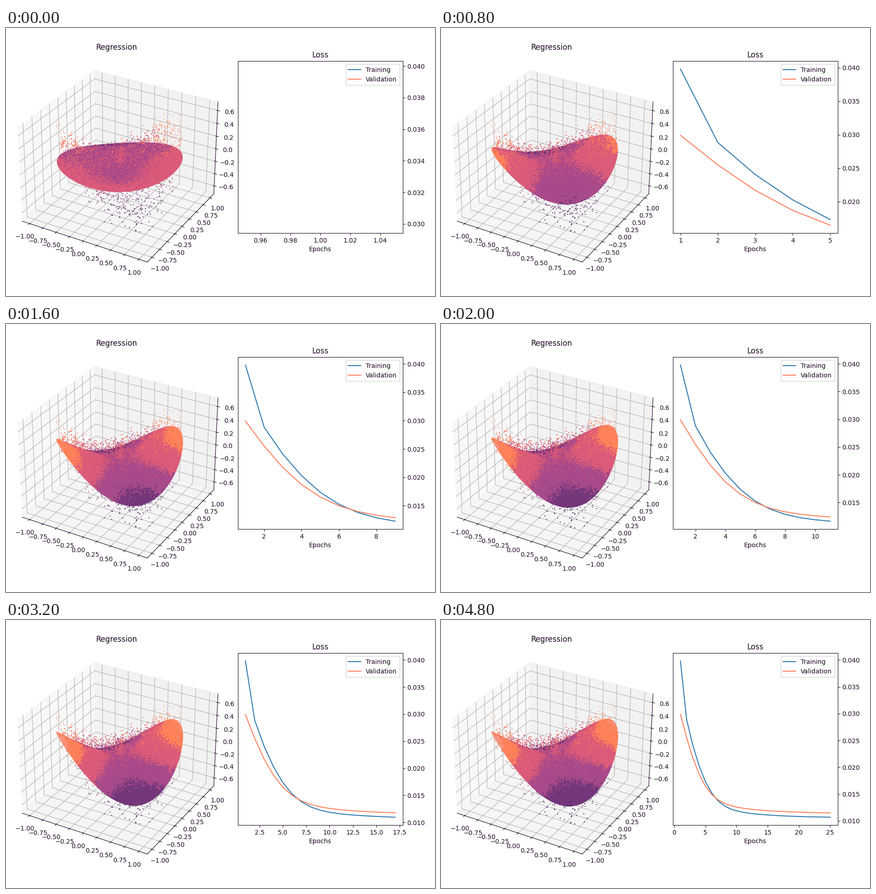
Animation, 947 px wide and 592 px high, one loop 5000 ms. Source, as a matplotlib script:

```python
import matplotlib.pyplot as plt
import numpy as np
from matplotlib.animation import FuncAnimation
from matplotlib.colors import to_rgba_array
from mpl_toolkits.mplot3d.art3d import Poly3DCollection

WIDTH, HEIGHT, DPI = 947, 592, 100
EPOCHS, INTERVAL = 25, 200
SAMPLES = 2800
RINGS, SECTORS = 56, 200
INK = "#1c0620"
BLUE, CORAL = "#2e78ae", "#ff7f5c"

# Colour bands by height, low to high
LEVELS = [-0.5, -0.34, -0.17, 0.0, 0.19, 0.34, 0.48]
PALETTE = to_rgba_array(["#2a0f38", "#4b2158", "#73357a", "#a84989",
                         "#db5a78", "#ff8057", "#f6947f", "#ffac88"])

plt.rcParams.update({
    "font.family": "DejaVu Sans", "text.color": INK, "axes.edgecolor": INK,
    "axes.labelcolor": INK, "axes.titlecolor": INK,
    "xtick.color": INK, "ytick.color": INK,
})


def band_colors(z):
    return PALETTE[np.digitize(z, LEVELS)]


def predict(radius, angle, epoch):
    """Fitted surface: a tilted disc that relaxes into a saddle."""
    untrained = np.exp(-(epoch - 1) / 4.7)
    rim = (0.016 - 0.026 * untrained
           + 0.085 * untrained * np.cos(angle)
           - (0.042 + 0.038 * untrained) * np.sin(angle)
           + (0.044 * untrained - 0.021) * np.cos(2 * angle)
           + (0.37 - 0.31 * untrained) * np.sin(2 * angle))
    centre = -0.05
    return centre + (rim - centre) * radius ** 1.3


def loss(epoch, floor, drop, rate, jump=0):
    """Fast first step, bell-shaped descent, then a slow tail."""
    return (floor + 0.0052 * np.exp(-epoch / 6.5)
            + drop * np.exp(-rate * epoch - 0.033 * epoch ** 2)
            + jump * np.exp(-3 * epoch))


def pixel_rect(left, top, width, height):
    return [left / WIDTH, 1 - (top + height) / HEIGHT,
            width / WIDTH, height / HEIGHT]


rng = np.random.default_rng(7)

# Noisy samples of sin(xy) on the unit disc
sample_r = rng.uniform(0, 1, SAMPLES)
sample_a = rng.uniform(0, 2 * np.pi, SAMPLES)
sample_x = sample_r * np.cos(sample_a)
sample_y = sample_r * np.sin(sample_a)
sample_z = np.sin(sample_x * sample_y) + rng.normal(0, 0.1, SAMPLES)
sample_z = np.clip(sample_z, -0.64, 0.64)
sample_colors = band_colors(sample_z)

# Polar mesh of the fitted surface
grid_r, grid_a = np.meshgrid(np.linspace(0, 1, RINGS + 1),
                             np.linspace(0, 2 * np.pi, SECTORS + 1),
                             indexing="ij")
grid_x, grid_y = grid_r * np.cos(grid_a), grid_r * np.sin(grid_a)
speckle = rng.normal(0, 0.022, RINGS * SECTORS)

fig = plt.figure(figsize=(WIDTH / DPI, HEIGHT / DPI), dpi=DPI)
space = fig.add_axes(pixel_rect(-1.6, 56, 492, 492), projection="3d",
                     computed_zorder=False)
space.set_title("Regression")
space.set_xlim(-1.146, 1.146)
space.set_ylim(-1.146, 1.146)
space.set_zlim(-0.733, 0.733)
space.set_xticks(np.arange(-4, 5) / 4)
space.set_yticks(np.arange(-4, 5) / 4)
space.set_zticks(np.arange(-3, 4) / 5)

chart = fig.add_axes(pixel_rect(512, 73.3, 363.5, 379.5))
chart.set_title("Loss")
chart.set_xlabel("Epochs")
chart.yaxis.tick_right()
training_line, = chart.plot([], [], color=BLUE, label="Training")
validation_line, = chart.plot([], [], color=CORAL, label="Validation")
chart.legend(loc="upper right")

drawn = []


def draw_samples(mask, zorder):
    drawn.append(space.scatter(
        sample_x[mask], sample_y[mask], sample_z[mask], c=sample_colors[mask],
        s=2.6, linewidths=0, depthshade=False, zorder=zorder))


def draw_surface(epoch):
    grid = np.stack([grid_x, grid_y, predict(grid_r, grid_a, epoch)], axis=-1)
    quads = np.stack([grid[:-1, :-1], grid[1:, :-1],
                      grid[1:, 1:], grid[:-1, 1:]], axis=2).reshape(-1, 4, 3)
    colors = band_colors(quads[:, :, 2].mean(axis=1) + speckle)
    surface = Poly3DCollection(quads, facecolors=colors, edgecolors=colors,
                               linewidths=0.5, zorder=2)
    space.add_collection3d(surface)
    drawn.append(surface)


def update(frame):
    epoch = frame + 1
    while drawn:
        drawn.pop().remove()
    # Samples under the surface are hidden by it
    above = sample_z > predict(sample_r, sample_a, epoch)
    draw_samples(~above, 1)
    draw_surface(epoch)
    draw_samples(above, 3)

    epochs = np.arange(1, epoch + 1)
    training_line.set_data(epochs, loss(epochs, 0.0106, 0.0222, 0.161, 0.13))
    validation_line.set_data(epochs, loss(epochs, 0.0114, 0.018, 0.214))
    chart.relim()
    chart.autoscale_view()
    return [*drawn, training_line, validation_line]


animation = FuncAnimation(fig, update, frames=EPOCHS, interval=INTERVAL,
                          init_func=lambda: update(0), repeat=True,
                          repeat_delay=0, blit=False)
plt.show()
```
